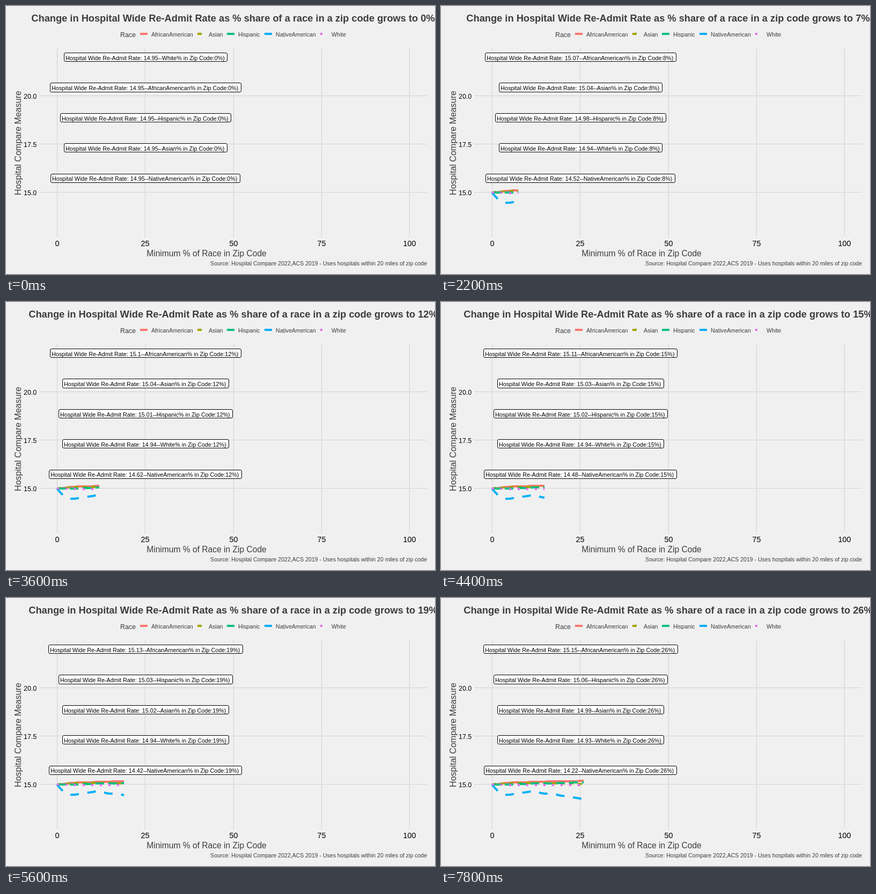
Recreate the animation shown at these times as an HTML page with a canvas. Size 800 by 500 pixels, loop 8000 ms.

```html
<!DOCTYPE html>
<html lang="en">
<head>
<meta charset="utf-8">
<title>Hospital re-admit rate by race share</title>
<style>
  html, body { margin: 0; width: 100%; height: 100%; overflow: hidden; background: #f0f0f0; }
  canvas { display: block; }
</style>
</head>
<body>
<canvas id="stage" width="800" height="500"></canvas>
<script>
const ctx = document.getElementById('stage').getContext('2d');
const STEP = 200, FRAMES = 40, FULL_STEPS = 149, BASE_RATE = 14.95;
const GREY = '#3c3c3c', GRID = '#d2d2d2';
const FONT = '"Liberation Sans", Arial, sans-serif';

const lerp = (a, b, k) => a + (b - a) * k;

// Straight segments from the origin through the given points, flat afterwards.
const through = (...points) => x => {
  let [x0, y0] = [0, 0];
  for (const [x1, y1] of points) {
    if (x <= x1) return lerp(y0, y1, (x - x0) / (x1 - x0));
    [x0, y0] = [x1, y1];
  }
  return y0;
};

// gain: change of the rate as the share grows; dash: on and off lengths
const races = [
  { name: 'AfricanAmerican', color: '#f8766d', dash: [], startRank: 1,
    gain: through([4, 0.1], [18, 0.18], [23, 0.18], [26, 0.2]) },
  { name: 'Asian', color: '#a3a500', dash: [8, 8], startRank: 3,
    gain: x => (1 - Math.exp(-x / 2.1)) * (0.09 - 0.00021 * (x - 10) ** 2) },
  { name: 'Hispanic', color: '#00bf7d', dash: [16, 8], startRank: 2,
    gain: through([4, 0], [10, 0.05], [19, 0.083], [23, 0.11]) },
  { name: 'NativeAmerican', color: '#00b0f6', dash: [16, 16], startRank: 4,
    gain: through([2, -0.38], [4, -0.53], [10, -0.38], [12, -0.33], [15, -0.47], [17, -0.45], [20, -0.575], [26, -0.73]) },
  { name: 'White', color: '#e76bf3', dash: [4, 12], startRank: 0,
    gain: x => -0.00075 * x }
];

// Chart coordinates snap to whole pixels.
const px = percent => Math.floor(95.4 + 6.573 * percent);
const py = rate => Math.floor(347.1 + 36 * (15 - rate));

function rankAt(race, percent) {
  if (percent === 0) return race.startRank;
  return races.filter(other => other.gain(percent) > race.gain(percent)).length;
}

// Each whole percent lands on a whole step; between them the reveal is linear.
function revealedPercent(step) {
  const stepOf = v => Math.round(v * FULL_STEPS / 100);
  let v = 0;
  while (stepOf(v + 1) <= step) v++;
  return v + (step - stepOf(v)) / (stepOf(v + 1) - stepOf(v));
}

function text(str, x, y, size, { align = 'left', color = GREY, weight = '' } = {}) {
  ctx.font = `${weight} ${size}px ${FONT}`;
  ctx.textAlign = align;
  ctx.fillStyle = color;
  ctx.fillText(str, x, y);
  return ctx.measureText(str).width;
}

function polyline(points, color, width, dash = []) {
  ctx.beginPath();
  points.forEach(([x, y]) => ctx.lineTo(x, y));
  ctx.strokeStyle = color;
  ctx.lineWidth = width;
  ctx.setLineDash(dash);
  ctx.stroke();
  ctx.setLineDash([]);
}

function drawAxes() {
  for (const rate of [15, 17.5, 20]) {
    const y = py(rate) + 0.5;
    polyline([[62, y], [785, y]], GRID, 1);
    text(rate.toFixed(1), 57, y + 5, 12.3, { align: 'right', color: '#000' });
  }
  for (let percent = 0; percent <= 100; percent += 25) {
    const x = px(percent) + 0.5;
    polyline([[x, 79], [x, 431]], GRID, 1);
    text(percent, x, 448, 14.4, { align: 'center', color: '#000' });
  }
  text('Minimum % of Race in Zip Code', 374, 467, 15.6, { align: 'center' });
  ctx.save();
  ctx.translate(28, 255.5);
  ctx.rotate(-Math.PI / 2);
  text('Hospital Compare Measure', 0, 0, 16, { align: 'center' });
  ctx.restore();
  text('Source: Hospital Compare 2022,ACS 2019 - Uses hospitals within 20 miles of zip code',
    785, 484, 10.52, { align: 'right' });
}

function drawLegend() {
  text('Race', 213, 58, 12.4);
  let x = 250;
  for (const { name, color, dash } of races) {
    const key = Math.round(x);
    polyline([[key, 52], [key + 14, 52]], color, 4, dash);
    x += 29 + text(name, key + 21, 57, 10.6);
  }
}

function drawSeries({ gain, color, dash }, percent) {
  const point = v => [px(v), py(BASE_RATE + gain(v))];
  const points = [];
  for (let v = 0; v < percent; v++) points.push(point(v));
  polyline([...points, point(percent)], color, 4, dash);
}

function drawLabel(race, percent) {
  const next = Math.ceil(percent), last = Math.floor(percent);
  const rate = +(BASE_RATE + race.gain(next)).toFixed(2);
  const str = `Hospital Wide Re-Admit Rate: ${rate}--${race.name}% in Zip Code:${next}%) `;
  const size = 10.75;
  ctx.font = `${size}px ${FONT}`;
  const width = Math.round(ctx.measureText(str).width + 4.5);
  const left = Math.round(259.6 - width / 2) + 0.5;
  const y = 87.12 + 56.35 * lerp(rankAt(race, last), rankAt(race, next), percent - last);
  const top = Math.round(y), bottom = Math.round(y + 16.18);
  ctx.beginPath();
  ctx.roundRect(left, top + 0.5, width, bottom - top, 2.5);
  ctx.fillStyle = '#fff';
  ctx.fill();
  ctx.strokeStyle = '#000';
  ctx.lineWidth = 1;
  ctx.stroke();
  text(str, left + 2.5, Math.round(y + 13.8), size, { color: '#000' });
}

function draw(now) {
  const step = Math.floor(now / STEP) % FRAMES;
  const percent = revealedPercent(step);
  const share = Math.round(step * 100 / FULL_STEPS);
  ctx.fillStyle = '#f0f0f0';
  ctx.fillRect(0, 0, 800, 500);
  drawAxes();
  drawLegend();
  text(`Change in Hospital Wide Re-Admit Rate as % share of a race in a zip code grows to ${share}%`,
    423.5, 29, 18.25, { align: 'center', weight: 'bold' });
  if (percent > 0) races.forEach(race => drawSeries(race, percent));
  races.forEach(race => drawLabel(race, percent));
}

const start = performance.now();
function tick() {
  draw(performance.now() - start);
  requestAnimationFrame(tick);
}
tick();
</script>
</body>
</html>
```
